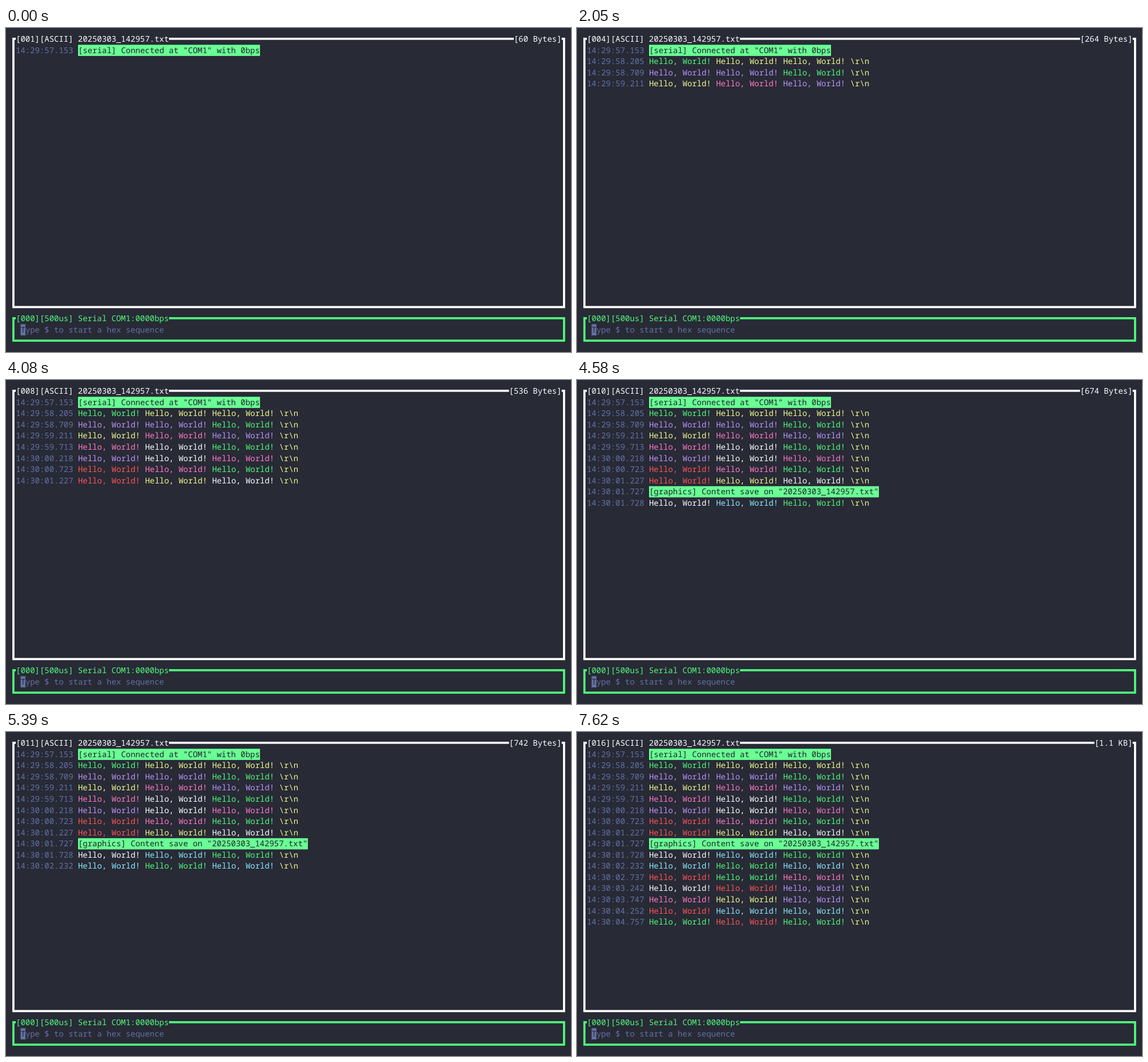
Write an HTML page that moves like this. It is 988x567 px and loops after 8 s.

```html
<!DOCTYPE html>
<html lang="en">
<head>
<meta charset="utf-8">
<title>Serial monitor</title>
<style>
  html, body { margin: 0; width: 100%; height: 100%; overflow: hidden; background: #282a36; }
  svg { display: block; }
  text {
    font: 13.955px "Noto Sans Mono", "DejaVu Sans Mono", monospace;
    font-variant-ligatures: none;
    text-rendering: geometricPrecision;
    white-space: pre;
  }
</style>
</head>
<body>
<svg id="stage" width="988" height="567" viewBox="0 0 988 567"></svg>
<script>
const LOOP = 8000;
const COL = 8.373, ROW = 19.56, LEFT = 17.15, TOP = 9.8;
const PALETTE = {
  g: '#50fa7b', y: '#f1fa8c', p: '#bd93f9', m: '#ff79c6',
  r: '#ff5555', c: '#8be9fd', w: '#ffffff'
};
const DIM = '#6272a4', DARK = '#21222c', BACK = '#282a36', NOTICE = '#69ff94';
const LOG_NAME = '20250303_142957.txt';

// Arrival in ms, timestamp, then word colours or a notice, and size in bytes.
const LOG = [
  { at: 0, stamp: '14:29:57.153', notice: '[serial] Connected at "COM1" with 0bps', size: 60 },
  ...[
    [1080, '29:58.205', 'gyy'],
    [1550, '29:58.709', 'ppg'],
    [2050, '29:59.211', 'ymp'],
    [2560, '29:59.713', 'mwg'],
    [3070, '30:00.218', 'pwm'],
    [3580, '30:00.723', 'rmg'],
    [4080, '30:01.227', 'ryw'],
    [4580, '30:01.727', ''],
    [4580, '30:01.728', 'wcg'],
    [5090, '30:02.232', 'cgc'],
    [5600, '30:02.737', 'rgm'],
    [6100, '30:03.242', 'wrp'],
    [6610, '30:03.747', 'myp'],
    [7110, '30:04.252', 'rcc'],
    [7620, '30:04.757', 'grg']
  ].map(([at, time, words]) => ({
    at, words, stamp: '14:' + time,
    notice: words ? '' : `[graphics] Content save on "${LOG_NAME}"`,
    size: words ? 68 : 70
  }))
];

// The history border blinks twice after a save.
const BLINKS = [[4790, 4990], [5190, 5390]];

const stage = document.getElementById('stage');

function add(parent, tag, attrs = {}, content = '') {
  const el = document.createElementNS('http://www.w3.org/2000/svg', tag);
  for (const key in attrs) el.setAttribute(key, attrs[key]);
  el.textContent = content;
  return parent.appendChild(el);
}

const colX = col => LEFT + col * COL;
const rowY = row => TOP + row * ROW;

function write(parent, col, row, content, fill) {
  const attrs = { x: colX(col), y: rowY(row) + 14.4 };
  if (fill) attrs.fill = fill;
  return add(parent, 'text', attrs, content);
}

function fillCells(parent, col, row, count, fill) {
  add(parent, 'rect', { x: colX(col), y: rowY(row), width: count * COL, height: ROW, fill });
}

// Heavy frame whose top edge leaves gaps for the titles.
function drawFrame(parent, firstRow, lastRow) {
  const mid = row => rowY(row) + 9.15;
  const x1 = colX(-0.5), x2 = colX(114.5);
  const y1 = mid(firstRow), y2 = mid(lastRow);
  add(parent, 'path', {
    d: `M${colX(0)} ${y1}H${x1}V${y2}H${x2}V${y1}H${colX(114)}`,
    fill: 'none', stroke: 'currentColor', 'stroke-width': 3.7
  });
  return add(parent, 'path', { stroke: 'currentColor', 'stroke-width': 3.7 });
}

function setTopEdge(edge, row, from, to) {
  edge.setAttribute('d', `M${colX(from)} ${rowY(row) + 9.15}H${colX(to)}`);
}

add(stage, 'rect', { width: 988, height: 567, fill: BACK });

const history = add(stage, 'g', { fill: 'currentColor' });
const historyEdge = drawFrame(history, 0, 24);
const title = write(history, 0, 0, '');
const sizeLabel = write(history, 0, 0, '');

const lines = LOG.map(({ stamp, notice, words }, i) => {
  const line = add(stage, 'g');
  const row = i + 1;
  write(line, 0, row, stamp, DIM);
  if (notice) {
    fillCells(line, 13, row, notice.length, NOTICE);
    write(line, 13, row, notice, DARK);
  } else {
    [...words].forEach((key, n) => write(line, 13 + 14 * n, row, 'Hello, World!', PALETTE[key]));
    write(line, 55, row, '\\r\\n', PALETTE.y);
  }
  return line;
});

const input = add(stage, 'g', { fill: 'currentColor', color: PALETTE.g });
setTopEdge(drawFrame(input, 25, 27), 25, 32, 114.5);
write(input, 0, 25, '[000][500us] Serial COM1:0000bps');
fillCells(input, 1, 26, 1, DIM);
write(input, 1, 26, 'T', BACK);
write(input, 2, 26, 'ype $ to start a hex sequence', DIM);

const formatSize = n => n < 1024 ? `[${n} Bytes]` : `[${(n / 1024).toFixed(1)} KB]`;

function render(t) {
  const shown = LOG.filter(entry => entry.at <= t);
  lines.forEach((line, i) => line.setAttribute('visibility', i < shown.length ? 'visible' : 'hidden'));

  const size = formatSize(shown.reduce((sum, entry) => sum + entry.size, 0));
  const sizeCol = 114 - size.length;
  title.textContent = `[${String(shown.length).padStart(3, '0')}][ASCII] ${LOG_NAME}`;
  sizeLabel.textContent = size;
  sizeLabel.setAttribute('x', colX(sizeCol));
  setTopEdge(historyEdge, 0, 32, sizeCol);

  const lit = BLINKS.some(([on, off]) => t >= on && t < off);
  history.setAttribute('color', lit ? NOTICE : PALETTE.w);
}

function tick() {
  render(performance.now() % LOOP);
  requestAnimationFrame(tick);
}
render(0);
requestAnimationFrame(tick);
</script>
</body>
</html>
```
